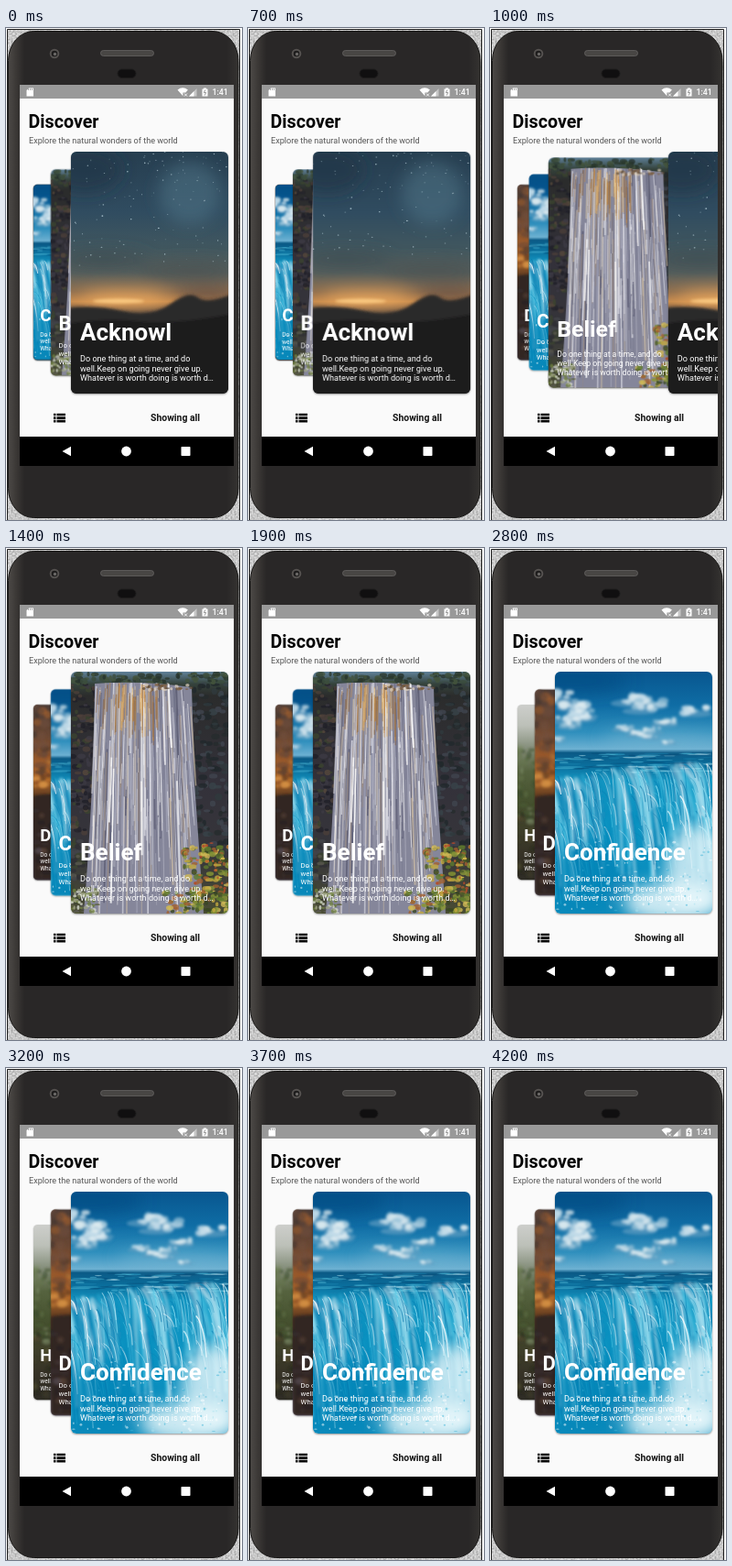
An HTML page that plays this animation: 258 px wide and 537 px high, repeating every 4300 ms.

```html
<!DOCTYPE html>
<html lang="en">
<head>
<meta charset="utf-8">
<title>Discover</title>
<style>
  html, body { margin: 0; width: 100%; height: 100%; overflow: hidden; background: #fff; }
  body { position: relative; font-family: Roboto, sans-serif; }
  svg { display: block; }
  .shell { position: absolute; left: 0; top: 0; }
  .deck { position: absolute; left: 15px; top: 77px; width: 234px; height: 369px; overflow: hidden;
    --front: translate(56px, 58px) scale(1);
    --mid: translate(34px, 77.3px) scale(.852);
    --back: translate(15px, 94px) scale(.724);
    --out: translate(240px, 58px) scale(1); }
  .card { position: absolute; left: 0; top: 0; width: 172px; height: 264px; border-radius: 6px;
    overflow: hidden; transform-origin: 0 0; transform: var(--back);
    box-shadow: 0 1px 2px rgba(0, 0, 0, .4); }
  .acknowl, .belief, .confidence, .desire { animation: 4300ms infinite cubic-bezier(.4, .1, .4, 1); }
  .acknowl { animation-name: first;
    background: linear-gradient(#263e50, #304c60 25%, #41575f 40%, #57605d 50%, #93714f 58%, #c98c4e 62%, #65503f 66%, #302b2b 72%, #1c1c1e 86%); }
  .belief { animation-name: second;
    background: linear-gradient(#5f8098, #35433c 5%, #2b2c2c 10%, #33313a 45%, #36353a 75%, #4a4d34); }
  .confidence { animation-name: third;
    background: linear-gradient(#08568f, #0f6da5 14%, #2f8fbd 25%, #6db1d2 32%, #0b5a86 33.5%, #0a6f9d 39%, #1597c3 45%, #0b93c2 65%, #0a8abb); }
  .desire { animation-name: fourth;
    background: linear-gradient(#4c3c37, #6b4834 18%, #a05c2a 34%, #b06a2c 43%, #56351f 53%, #30241f 66%, #3c3337 82%, #5d5563); }
  .hope { background: linear-gradient(#cdcecb, #bcc0b8 12%, #88917e 24%, #56633f 38%, #46522f 54%, #3f402a 70%, #363226 85%, #2e2c25); }
  .stars { animation: drift 4300ms infinite linear; }

  /* two swipes: 700-1300 ms and 2050-2750 ms */
  @keyframes first { 0%, 16.28% { transform: var(--front); } 30.23%, 100% { transform: var(--out); } }
  @keyframes second { 0%, 16.28% { transform: var(--mid); } 30.23%, 47.67% { transform: var(--front); } 63.95%, 100% { transform: var(--out); } }
  @keyframes third { 0%, 16.28% { transform: var(--back); } 30.23%, 47.67% { transform: var(--mid); } 63.95%, 100% { transform: var(--front); } }
  @keyframes fourth { 0%, 47.67% { transform: var(--back); } 63.95%, 100% { transform: var(--mid); } }
  @keyframes drift { 0% { transform: none; } 16.28%, 100% { transform: translate(7px, -8px); } }
</style>
</head>
<body>
<svg class="shell" width="258" height="537" viewBox="0 0 258 537">
  <defs>
    <filter id="grain" x="0" y="0" width="100%" height="100%">
      <feTurbulence type="fractalNoise" baseFrequency=".5" numOctaves="2" seed="4"/>
      <feColorMatrix values=".7 0 0 0 .22  .7 0 0 0 .22  .7 0 0 0 .22  0 0 0 0 1"/>
    </filter>
    <filter id="fine"><feGaussianBlur stdDeviation=".6"/></filter>
    <filter id="soft"><feGaussianBlur stdDeviation="1.6"/></filter>
    <filter id="haze" x="-50%" y="-50%" width="200%" height="200%"><feGaussianBlur stdDeviation="9"/></filter>
    <linearGradient id="rim">
      <stop offset="0" stop-color="#4d4a47"/><stop offset=".04" stop-color="#383533"/>
      <stop offset=".07" stop-color="#292727"/><stop offset=".95" stop-color="#292727"/>
      <stop offset="1" stop-color="#353331"/>
    </linearGradient>
  </defs>
  <rect x="1" y="1" width="254" height="536" filter="url(#grain)"/>
  <path d="M1.500 537V1.500H255.500V537" fill="none" stroke="#1c1c1c"/>
  <rect x="2.500" y="3.500" width="251.500" height="531" rx="28" ry="32" fill="url(#rim)" stroke="#191817"/>
  <circle cx="53" cy="28" r="4.300" fill="#1d1c1c" stroke="#555250" stroke-width="2"/>
  <circle cx="53.500" cy="28.500" r="1.700" fill="#6b6967"/>
  <rect x="103.500" y="24.500" width="58" height="6" rx="3" fill="#484644" stroke="#666462" stroke-width=".8"/>
  <rect x="122" y="45" width="20" height="9.500" rx="4.700" fill="#100f10" stroke="#1d1c1c"/>
  <rect x="15" y="62" width="234" height="384" fill="#fafafa"/>
  <rect x="15" y="62" width="234" height="15" fill="#999"/>
  <g fill="#fff">
    <path d="M22.500 68l2.500-2.500h5v9h-7.500z"/>
    <path d="M187.500 67.500q5.700-4.500 11.400 0l-2.500 3h-3v3.700z"/>
    <path d="M200 74.500h8.500V66z" fill-opacity=".45"/>
    <path d="M200 74.500h5.500V69z"/>
    <path d="M214.500 66.500h1.500v-1h3v1h1.500v8h-6z"/>
    <text x="225.500" y="73" font-size="8.800" font-weight="500">1:41</text>
  </g>
  <path d="M24.500 66v2M26.500 66v2M28.500 66v2" stroke="#999" stroke-width=".8"/>
  <path d="M195 71.500l3 3m0-3l-3 3" stroke="#fff" stroke-width=".9"/>
  <path d="M217.900 67.500l-1.500 3h2.200l-1.400 3" fill="none" stroke="#888" stroke-width=".9"/>
  <text x="24.600" y="108.500" font-size="19.650" font-weight="700" fill="#050505">Discover</text>
  <text x="25" y="125.500" font-size="9.100" fill="#555">Explore the natural wonders of the world</text>
  <path d="M52 422h2.500m1 0H65M52 425.600h2.500m1 0H65M52 429.200h2.500m1 0H65" stroke="#080808" stroke-width="2.700"/>
  <text x="158" y="428.600" font-size="10.450" font-weight="700" fill="#151515">Showing all</text>
  <rect x="15" y="446" width="234" height="32"/>
  <g fill="#fff">
    <path d="M61.500 462l9.500-5.300v10.600z"/>
    <circle cx="131.500" cy="462" r="5.400"/>
    <rect x="191.500" y="457" width="10" height="10" rx=".8"/>
  </g>
</svg>
<div class="deck" id="deck"></div>

<script>
const random = seed => () => (seed = seed * 16807 % 2147483647) / 2147483647;
const many = (n, draw) => Array.from({ length: n }, (_, i) => draw(i)).join('');
const pick = (list, r) => list[Math.floor(r * list.length)];
const blob = (x, y, rx, ry, fill, opacity = 1) =>
  `<ellipse cx="${x}" cy="${y}" rx="${rx}" ry="${ry}" fill="${fill}" opacity="${opacity}"/>`;
const shape = (d, fill) => `<path d="${d}" fill="${fill}"/>`;
const streak = (x, y, dx, dy, color, width, opacity, bend = .2) =>
  `<path d="M${x} ${y}q${dx * bend} ${dy * .2} ${dx} ${dy}" fill="none" stroke="${color}" stroke-width="${width}" opacity="${opacity}"/>`;
const blur = (id, inner) => `<g filter="url(#${id})">${inner}</g>`;

// scatter blobs over a box
const scatter = (r, n, x, y, w, h, size, colors, opacity = .8) => many(n, () =>
  blob(x + r() * w, y + r() * h, size * (.5 + r()), size * (.4 + r() * .7), pick(colors, r()), opacity));

function nightSky() {
  const r = random(71);
  const stars = many(130, () => {
    const x = r() * 190 - 10, y = r() ** 1.4 * 125;
    return blob(x, y, .35 + r() * .55, .35 + r() * .5, '#c9e0e8', .25 + r() * .6);
  });
  return blur('haze', blob(130, 45, 34, 34, '#587f90', .45) + blob(15, 20, 40, 25, '#1c3243', .6) +
      blob(35, 118, 50, 9, '#3c4b51', .7) + blob(130, 130, 55, 10, '#4a5150', .7) +
      blob(58, 161, 48, 8, '#f5b163', .85) + blob(150, 158, 34, 9, '#5e4c42', .8)) +
    `<g class="stars">${stars}</g>` +
    blur('soft', blob(52, 163, 28, 2.5, '#ffd38a', .8) +
      shape('M-5 171q30-4 62 3t52-8 30-7 40-5V270H-5z', '#2c292a') +
      shape('M-5 188q40-7 80-3t105-9V270H-5z', '#1c1c1e'));
}

function tallFalls() {
  const r = random(29);
  const cliff = ['#3d3b45', '#4b3f39', '#25242c', '#3b4430', '#56483c', '#1f1f28'];
  const rock = ['#20282c', '#2f3a3d', '#38434a', '#262c2d', '#40454f'];
  const leaf = ['#8a9638', '#5f7a2e', '#c3a940', '#37461f', '#a3602f', '#4c5b2a', '#d0b956'];
  const water = ['#fff', '#e4e4ec', '#a9abbd', '#72748c', '#c9b9a4', '#57586f', '#9a8a80'];
  return blur('fine', scatter(r, 150, 0, 10, 32, 190, 3, cliff) +
      scatter(r, 80, 0, 185, 28, 80, 3.5, ['#44454a', '#2f2f35', '#59584f', '#3b4430']) +
      scatter(r, 170, 126, 14, 50, 180, 3.5, rock) +
      scatter(r, 90, 0, 2, 172, 10, 3, ['#2c3a2e', '#27332d', '#44543c', '#3b4c3c'])) +
    shape('M26 13Q75 9 132 17L135 120 145 264H14Q25 130 26 13z', '#85869a') +
    blur('fine', many(190, () => {
      const x = 27 + r() * 104, y = 12 + r() ** 2 * 130;
      return streak(x, y, (x - 75) * .1, 40 + r() * 130, pick(water, r()), .5 + r() * 1.8, .35 + r() * .5);
    }) +
    many(75, () => {
      const x = 27 + r() * 70;
      return streak(x, 12 + r() * 22, (x - 75) * .03, 14 + r() * 36, pick(['#c98738', '#dfb06a', '#8d6236', '#efd9b0'], r()), .6 + r() * 1.2, .5);
    })) +
    many(70, () => {
      const x = 28 + r() * 104;
      return streak(x, 25 + r() * 150, (x - 75) * .07, 15 + r() * 70, pick(['#fff', '#e9e9f0', '#5d5e75'], r()), .3 + r() * .6, .4 + r() * .4);
    }) +
    blur('fine', scatter(r, 28, 78, 14, 55, 6, 2, ['#57452f', '#7c5b38', '#dfd2bd'], .7) +
      scatter(r, 160, 122, 190, 55, 74, 3, leaf) +
      scatter(r, 60, 100, 238, 72, 28, 2.8, leaf) +
      scatter(r, 20, 130, 180, 42, 60, 1.6, ['#b8482a', '#d1662d', '#e6c451']) +
      scatter(r, 65, 0, 236, 30, 28, 2.3, ['#6f7f40', '#a0a586', '#565c38', '#d5d8cc']));
}

function wideFalls() {
  const r = random(53);
  const foam = ['#fff', '#d9f4fb', '#8adcf0', '#45c0e0', '#0b86b8', '#0a73a8'];
  const lip = x => 113 - 13 * Math.min(1, x / 110) + 2 * Math.sin(x / 14);
  const puff = (x, y, size) => blob(x, y + size * .35, size * 1.7, size * .35, '#5d9cc0', .7) +
    many(9, () => blob(x + (r() - .5) * size * 2.6, y + (r() - .6) * size * .6, size * (.25 + r() * .4),
      size * (.15 + r() * .25), pick(['#c2dbe8', '#e2edf2', '#93bfd6'], r()), .75));
  return blur('haze', blob(20, 10, 60, 14, '#084880', .6) + blob(120, 72, 70, 7, '#8fc4dc', .5)) +
    blur('soft', many(17, i => puff(r() * 172, 27 + i * 3.1, 13 - i * .5))) +
    blur('fine', many(90, () => {
      const y = 89 + r() * 22;
      return blob(r() * 172, y, 3 + r() * 12, .4 + r() * .7, pick(['#084d78', '#1780ac', '#4bb5d3', '#b3e0ec'], r()), .55);
    })) +
    blur('soft', many(110, () => {
      const x = r() * 200 - 35;
      return streak(x, lip(x) + r() * 8, 6 + r() * 22, 35 + r() * 100, pick(foam, r()), 1 + r() * 3, .35 + r() * .45, .75);
    })) +
    blur('fine', many(190, () => {
      const x = r() * 205 - 35;
      return streak(x, lip(x) + r() ** 1.5 * 95, 3 + r() * 11, 12 + r() * 45, pick(foam, r()), .4 + r() * 1.1, .4 + r() * .45, .75);
    })) +
    blur('haze', blob(32, 222, 42, 34, '#0782b6', .6) + blob(155, 215, 34, 48, '#e8f7fb', .8) +
      blob(130, 252, 55, 22, '#eefafc', .85)) +
    blur('fine', many(150, () => {
      const x = r() * 172;
      return blob(x, 185 + r() * 79, .5 + r() * 1.8, .4 + r() * 1.2, pick(['#fff', '#a9e2f0', '#3db4d8'], r()), .5);
    }));
}

function duskSky() {
  const r = random(17);
  return blur('soft', scatter(r, 110, 0, 0, 172, 110, 7, ['#3a302e', '#72503d', '#b8692d', '#5b4337'], .5) +
    scatter(r, 50, 0, 75, 172, 50, 6, ['#d18a3a', '#8a4a24', '#e3a050', '#4a2d1f'], .55) +
    shape('M0 138Q40 128 172 150V264H0z', '#302623') +
    scatter(r, 110, 0, 140, 172, 124, 5, ['#231f21', '#4e4042', '#6a5f6a', '#3a3032', '#5c4438'], .5));
}

function forest() {
  const r = random(83);
  return blur('soft', scatter(r, 140, 0, 62, 172, 115, 5, ['#64744a', '#3a4a2c', '#808f6c', '#4c5f35'], .5) +
    scatter(r, 100, 0, 165, 172, 99, 5, ['#403d2a', '#55512f', '#26281c', '#5a4a32'], .5));
}

const body = ['Do one thing at a time, and do', 'well.Keep on going never give up.', 'Whatever is worth doing is worth d…'];
const cards = [
  ['Acknowl', nightSky], ['Belief', tallFalls], ['Confidence', wideFalls],
  ['Desire', duskSky], ['Hope', forest]
];

document.getElementById('deck').innerHTML = cards.map(([title, art]) => `
  <div class="card ${title.toLowerCase()}">
    <svg width="172" height="264" viewBox="0 0 172 264">${art()}
      <g fill="#fff">
        <text x="10" y="206" font-size="26" font-weight="700">${title}</text>
        ${body.map((line, i) => `<text x="10" y="${229 + i * 10.6}" font-size="9.1">${line}</text>`).join('')}
      </g>
    </svg>
  </div>`).reverse().join('');
</script>
</body>
</html>
```
